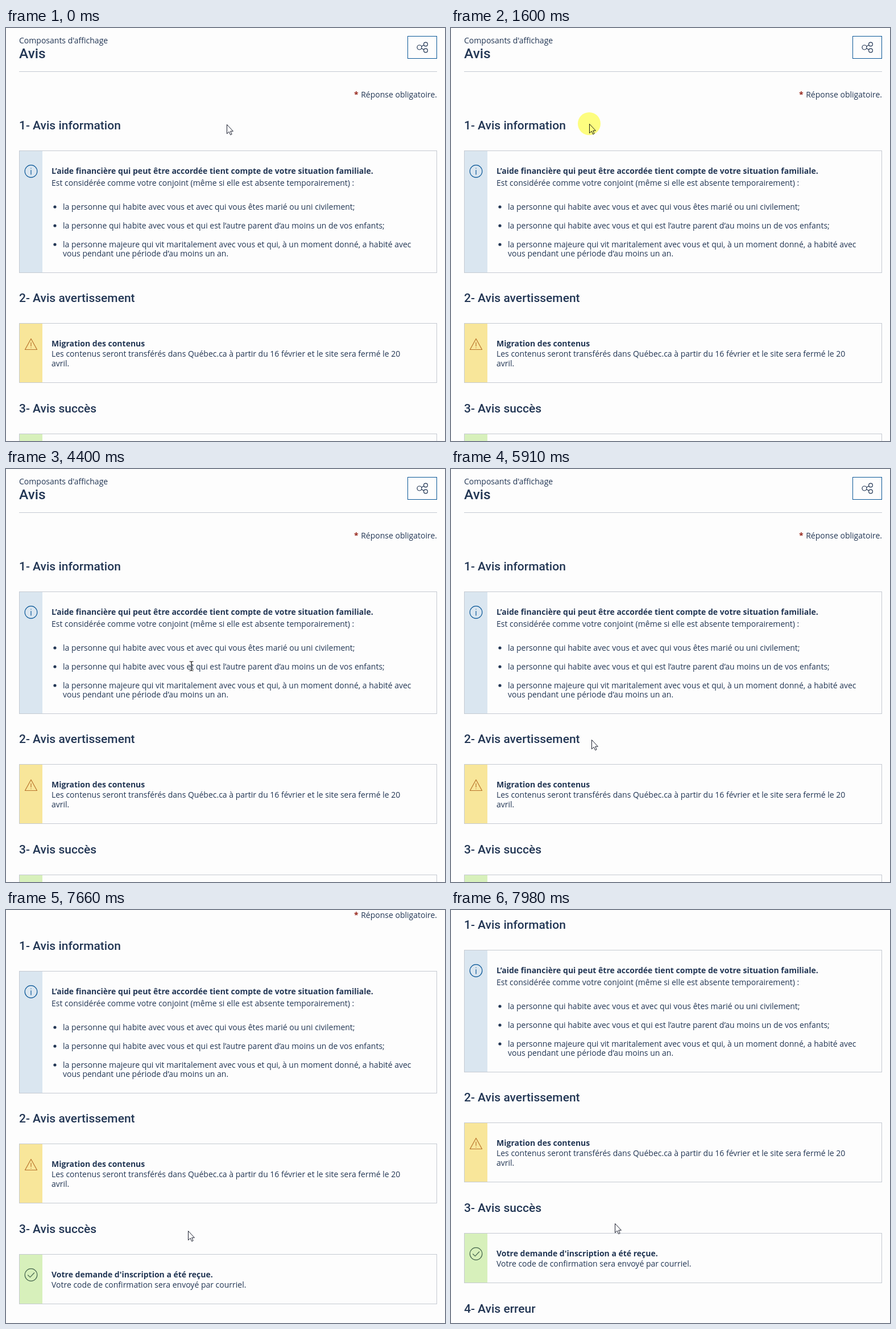
An HTML page that plays this animation: 772x725 px, repeating every 8000 ms.

```html
<!DOCTYPE html>
<html lang="fr">
<head>
<meta charset="utf-8">
<title>Avis</title>
<style>
  html, body { margin: 0; width: 100%; height: 100%; overflow: hidden; background: #fdfdfd; }
  svg { display: block; }
  text { font: 14px "Open Sans", "Noto Sans", sans-serif; fill: #223654; }
  .b { font-weight: 700; }
  .h { font: 500 21px Roboto, Arial, sans-serif; }
  .title { font-size: 24.5px; }
  .req { font-weight: 700; fill: #96261c; }
  .line { fill: none; stroke: #c5cad2; }
  .icon { fill: none; stroke-width: 1.2; stroke-linecap: round; stroke-linejoin: round; }
  #halo { fill: #ffff80; mix-blend-mode: multiply; }
</style>
</head>
<body>
<svg width="772" height="725" viewBox="0 0 772 725">
  <defs>
    <path id="caret" d="M-3.5 -8H-1L0 -7 1 -8H3.5M0 -7V7M-3.5 8H-1L0 7 1 8H3.5"/>
  </defs>
  <g id="page">
    <text x="23" y="27">Composants d'affichage</text>
    <text class="h title" x="23" y="53">Avis</text>
    <rect x="706.5" y="14.5" width="51" height="39" fill="none" stroke="#095797"/>
    <g class="icon" stroke="#223654">
      <path d="M730.6 32.2 734.8 30M730.6 35.8 734.8 38"/>
      <circle cx="727" cy="34" r="4"/>
      <circle cx="738" cy="28.5" r="3.4"/>
      <circle cx="738" cy="39.5" r="3.4"/>
    </g>
    <path class="line" d="M23 76.5H758"/>
    <text class="req" x="612" y="122">*</text>
    <text x="758" y="122" text-anchor="end">Réponse obligatoire.</text>
    <g id="notices"></g>
  </g>
  <path id="arrow" d="M.5 .5V16.6L4.2 13.1 6.7 18.6 9.1 17.5 6.7 12.2H11.4Z" fill="#fff" stroke="#1c2030" stroke-linejoin="round"/>
  <g id="beam" fill="none">
    <use href="#caret" stroke="#fff" stroke-width="2.4" opacity=".7"/>
    <use href="#caret" stroke="#111" stroke-width="1.2"/>
  </g>
  <circle id="halo" r="20"/>
</svg>
<script>
const $ = id => document.getElementById(id);

// Icons are drawn around their own centre
const ring = `<circle r="10.8"/>`;
const icons = {
  info: `<g class="icon" stroke="#095797">${ring}<path d="M0 -2V5.5M0 -5.5V-5.2"/></g>`,
  warn: `<g class="icon" stroke="#b9742c"><path d="M0 -9 10.5 10H-10.5ZM0 -2.5V4M0 6.8V7"/></g>`,
  done: `<g class="icon" stroke="#46664e">${ring}<path d="M-5.4 .5 -1.6 4.1 5.6 -3.5"/></g>`
};

const text = (x, y, s, cls = "") => `<text class="${cls}" x="${x}" y="${y}">${s}</text>`;
const heading = (y, s) => text(23, y, s, "h");
const bullet = (y, s) => `<circle cx="86" cy="${y - 5}" r="2.6" fill="#223654"/>` + text(100, y, s);

function notice(top, height, tint, icon, name, title, body) {
  return heading(top - 37, name) +
    `<rect x="23" y="${top}" width="41" height="${height}" fill="${tint}"/>` +
    `<rect class="line" x="23.5" y="${top + .5}" width="734" height="${height}"/>` +
    `<g transform="translate(44 ${top + 36.5})">${icons[icon]}</g>` +
    text(80, top + 41, title, "b") + body(top + 59);
}

$("notices").innerHTML =
  notice(215, 214, "#dae6f0", "info", "1- Avis information",
    "L’aide financière qui peut être accordée tient compte de votre situation familiale.",
    y => text(80, y + 3, "Est considérée comme votre conjoint (même si elle est absente temporairement) :") +
      [
        "la personne qui habite avec vous et avec qui vous êtes marié ou uni civilement;",
        "la personne qui habite avec vous et qui est l’autre parent d’au moins un de vos enfants;",
        "la personne majeure qui vit maritalement avec vous et qui, à un moment donné, a habité avec"
      ].map((s, i) => bullet(y + 45 + 33 * i, s)).join("") +
      text(100, y + 127, "vous pendant une période d’au moins un an.")) +
  notice(518, 104, "#f8e69a", "warn", "2- Avis avertissement",
    "Migration des contenus",
    y => text(80, y, "Les contenus seront transférés dans Québec.ca à partir du 16 février et le site sera fermé le 20") +
      text(80, y + 17, "avril.")) +
  notice(712, 87, "#d7f0bb", "done", "3- Avis succès",
    "Votre demande d'inscription a été reçue.",
    y => text(80, y, "Votre code de confirmation sera envoyé par courriel.")) +
  heading(852, "4- Avis erreur");

const textBoxes = [...document.querySelectorAll("text")].map(el => el.getBBox());
const isText = (x, y) => textBoxes.some(b =>
  x >= b.x && x <= b.x + b.width && y >= b.y && y <= b.y + b.height);

// Pointer moves: each glides from the previous spot and slows down on arrival
const home = { x: 388, y: 169 };
const moves = [
  { from: 830, to: 1440, x: 243, y: 168 },
  { from: 3160, to: 4400, x: 326, y: 346 },
  { from: 4400, to: 5100, x: 247, y: 475 },
  { from: 6090, to: 7070, x: 319, y: 576 },
  { from: 7070, to: 7290, x: 320, y: 563 },
  { from: 7710, to: 7980, x: 288, y: 550 }
];
const scroll = { from: 7500, to: 7825, by: 145 };
const clicks = [{ from: 1600, to: 2560 }, { from: 5100, to: 5910 }];

function progress(t, { from, to }) {
  const left = 1 - Math.min(1, Math.max(0, (t - from) / (to - from)));
  return 1 - left * left;
}

function pointer(t) {
  let { x, y } = home;
  for (const m of moves) {
    const p = progress(t, m);
    x += (m.x - x) * p;
    y += (m.y - y) * p;
  }
  return [Math.round(x), Math.round(y)];
}

const place = (id, x, y) => $(id).setAttribute("transform", `translate(${x} ${y})`);
const show = (id, on) => $(id).setAttribute("visibility", on ? "visible" : "hidden");

function draw(t) {
  const top = Math.round(scroll.by * progress(t, scroll));
  const [x, y] = pointer(t);
  const overText = isText(x, y + top);
  place("page", 0, -top);
  for (const id of ["arrow", "beam", "halo"]) place(id, x, y);
  show("arrow", !overText);
  show("beam", overText);
  show("halo", clicks.some(c => t >= c.from && t < c.to));
}

const start = performance.now();
function tick() {
  draw((performance.now() - start) % 8000);
  requestAnimationFrame(tick);
}
tick();
</script>
</body>
</html>
```
